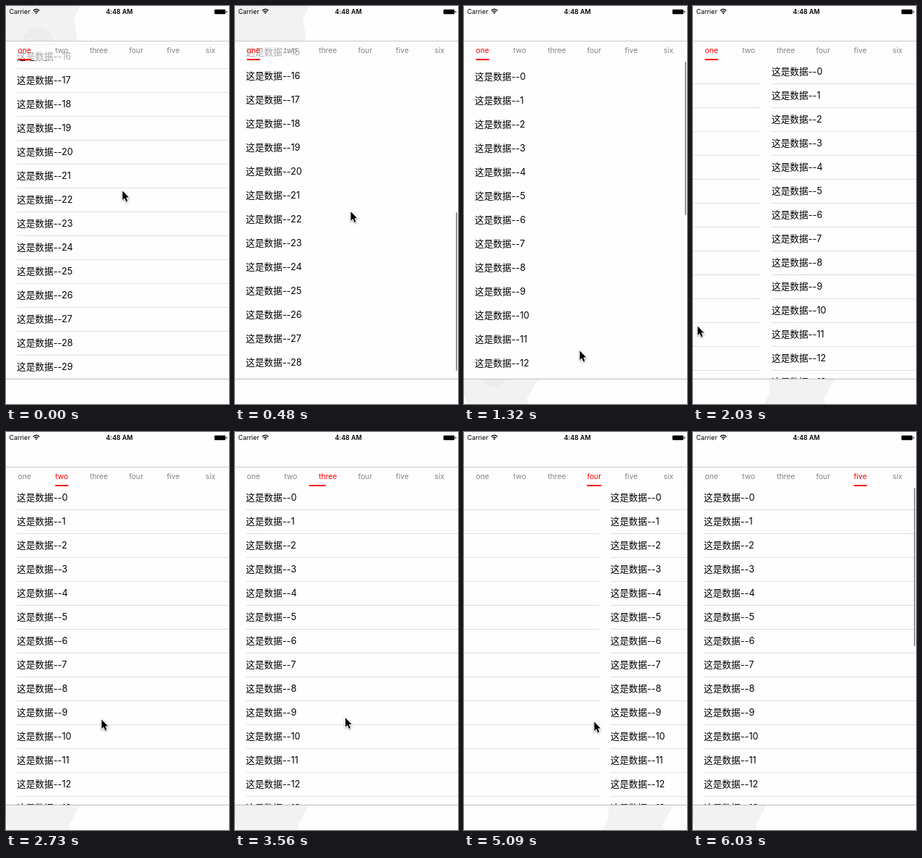
An HTML page for the animation above (6320 ms loop, 309 px wide and 550 px high).

```html
<!DOCTYPE html>
<html lang="zh">
<head>
<meta charset="utf-8">
<title>Paged lists</title>
<style>
html, body { margin: 0; width: 100%; height: 100%; overflow: hidden; background: #fefefe; }
#stage {
  position: relative; width: 309px; height: 550px; overflow: hidden; background: #fefefe;
  font-family: Inter, "Noto Sans CJK SC", "Noto Sans CJK", sans-serif;
  font-variant-ligatures: none;
}
#stage div, #stage svg { position: absolute; box-sizing: border-box; white-space: nowrap; }
#strip { left: 0; top: 0; --edge: 0px; }
.page { top: 0; width: 309px; height: 550px; overflow: hidden; }
.view { top: 48px; width: 309px; height: 468px; overflow: hidden; }
.list { top: 27px; left: 15px; width: 294px; }
.row {
  width: 100%; height: 33px; border-bottom: 1px solid #dedede;
  font-size: 12.7px; line-height: 32px; color: #000;
}
.moving .row { border-color: transparent; }
.blur { left: 0; width: 110px; background: #f2f2f2; overflow: hidden; }
.blur.top { top: 0; height: 48px; clip-path: polygon(0 0, 103px 0, 94px 18px, 98px 40px, 99px 48px, 0 48px); }
.blur.low { top: 516px; height: 34px; clip-path: polygon(var(--edge) 0, 103px 0, 95px 12px, 92px 20px, 87px 25px, 89px 34px, 4px 34px, var(--edge) 20px); }
.dome { border-radius: 50%; background: #ececec; left: 26px; width: 32px; height: 32px; }
.top .dome { top: 30px; left: 22px; width: 44px; height: 44px; }
.moving ~ .top .dome { display: none; }
.bar { right: 1px; width: 2px; border-radius: 1px; background: #959595; }
#tabs { top: 49px; width: 309px; height: 26px; background: rgba(254, 254, 254, .66); }
.tab { width: 51.5px; height: 24px; line-height: 24px; text-align: center; font-size: 10.3px; color: #858585; }
.tab.on { color: #f00; }
#mark { left: 0; top: 24px; height: 2px; background: #f00; }
.rule { width: 309px; height: 1px; }
.status { top: 0; height: 16px; line-height: 16px; font-size: 8.9px; color: #000; }
#cursor { left: 0; top: 0; overflow: visible; filter: drop-shadow(0 1px 1px rgba(0, 0, 0, .35)); }
</style>
</head>
<body>
<div id="stage">
  <div id="strip"></div>
  <div id="tabs"><div id="mark"></div></div>
  <div class="rule" style="top:48px;background:#c8c8c8"></div>
  <div class="rule" style="top:515px;background:#bcbcbc"></div>
  <div class="status" style="left:4.5px">Carrier</div>
  <div class="status" style="left:0;width:314px;text-align:center;font-weight:600">4:48 AM</div>
  <svg width="309" height="16" style="left:0;top:0">
    <path d="M37.7 6.4Q42 2.4 46.3 6.4M39.4 8.3Q42 6 44.6 8.3" fill="none" stroke="#000" stroke-width="1.3"/>
    <path d="M40.6 9.4Q42 8.3 43.4 9.4L42 11z"/>
    <rect x="289" y="5" width="15" height="6" rx="1" stroke="#000" stroke-opacity=".45"/>
    <rect x="305.2" y="6.8" width="1.2" height="2.4" rx=".6"/>
  </svg>
  <svg id="cursor" width="12" height="18">
    <path d="M.5 .5V13L3.4 10.4 5.5 15.4 7.5 14.6 5.4 9.6H9.2Z" stroke="#fff" stroke-width="1.8" paint-order="stroke"/>
  </svg>
</div>
<script>
const LOOP = 6320, TICK = 118.25, LAST = 51;
const WIDTH = 309, ROW = 33, RANGE = 549, BAR = 219;
const SWIPES = [15, 25, 32, 42], SWIPE_TICKS = 4;

// Pointer key points: tick, x, y
const POINTER = [[0, 161, 255], [1, 160, 248], [3, 160, 248], [7, 160, 476], [13, 160, 476],
  [15, 221, 444], [17, 6, 442], [21, 6, 442], [25, 258, 352], [28, 40, 394], [32, 265, 395],
  [34, 153, 395], [39, 153, 395], [42, 250, 400], [44, 110, 400], [47, 110, 400], [51, 300, 570]];

const $ = id => document.getElementById(id);
const clamp = x => Math.min(1, Math.max(0, x));
const mix = (a, b, p) => a + (b - a) * p;
const smooth = x => (x = clamp(x)) * x * (3 - 2 * x);
const settle = x => 1 - (1 - clamp(x)) ** 1.72;
const bump = (k, from, to) => k > from && k < to ? Math.sin(Math.PI * (k - from) / (to - from)) : 0;

function add(parent, cls, text = '') {
  const el = document.createElement('div');
  el.className = cls;
  el.textContent = text;
  return parent.appendChild(el);
}

function makePage(i) {
  const page = add($('strip'), 'page');
  page.style.left = i * WIDTH + 'px';
  const view = add(page, 'view'), list = add(view, 'list');
  for (let n = 0; n < 30; n++) add(list, 'row', '这是数据--' + n).style.top = n * ROW + 'px';
  const top = add(page, 'blur top'), low = add(page, 'blur low');
  add(top, 'dome');
  return { view, list, top, low, dome: add(low, 'dome'), bar: add(page, 'bar') };
}

function makeTab(name, i) {
  const tab = add($('tabs'), 'tab', name);
  tab.style.left = i * WIDTH / 6 + 'px';
  const text = document.createRange();
  text.selectNodeContents(tab);
  return { tab, width: text.getBoundingClientRect().width, mid: (i + .5) * WIDTH / 6 };
}

function showList(page, scroll, barAlpha) {
  const show = (el, on) => el.style.display = on ? '' : 'none';
  const moving = scroll !== 0 && scroll !== RANGE;
  page.list.style.transform = `translateY(${-Math.round(scroll)}px)`;
  page.view.classList.toggle('moving', moving);
  show(page.top, scroll > 50);
  show(page.low, scroll < 510);
  show(page.dome, moving);
  page.dome.style.top = -20 + .176 * scroll + 'px';
  page.bar.style.top = 76.5 + clamp(scroll / RANGE) * BAR + 'px';
  page.bar.style.height = BAR + Math.min(0, scroll) + 'px';
  page.bar.style.opacity = barAlpha;
}

function showTabs(k) {
  const ends = SWIPES.map(t => t + SWIPE_TICKS).filter(t => t <= k);
  const now = ends.length, to = tabs[now], from = tabs[Math.max(0, now - 1)];
  const p = now ? smooth(.25 + .4 * (k - ends[now - 1])) : 1;
  const width = mix(from.width, to.width, p);
  tabs.forEach((t, i) => t.tab.classList.toggle('on', i === now));
  $('mark').style.width = width + 'px';
  $('mark').style.transform = `translateX(${mix(from.mid, to.mid, p) - width / 2}px)`;
}

function showPointer(k) {
  const i = Math.max(1, POINTER.findIndex(key => key[0] >= k));
  const [t0, x0, y0] = POINTER[i - 1], [t1, x1, y1] = POINTER[i];
  const p = smooth((k - t0) / (t1 - t0));
  $('cursor').style.transform = `translate(${mix(x0, x1, p)}px, ${mix(y0, y1, p)}px)`;
}

function draw(k) {
  const place = SWIPES.reduce((sum, t) => sum + settle((k - t) / SWIPE_TICKS), 0);
  $('strip').style.transform = `translateX(${-Math.round(place * WIDTH)}px)`;
  $('strip').style.setProperty('--edge', place % 1 ? '12px' : '0px');
  const first = RANGE * (1 - smooth((k - 3) / 7.43)) - 7 * bump(k, 10, 12);
  showList(pages[0], first, k > 3 ? clamp((15 - k) / 2) : 0);
  showList(pages[4], -12 * bump(k, 47, 51), k > 47 ? 1 : 0);
  showTabs(k);
  showPointer(k);
}

const pages = [0, 1, 2, 3, 4].map(makePage);
const tabs = ['one', 'two', 'three', 'four', 'five', 'six'].map(makeTab);
pages.forEach(page => showList(page, 0, 0));

const start = performance.now();
let shown = -1;
function frame() {
  const t = (performance.now() - start) % LOOP;
  const k = Math.min(LAST, Math.floor((t + 3) / TICK));
  if (k !== shown) draw(shown = k);
  requestAnimationFrame(frame);
}
frame();
</script>
</body>
</html>
```
